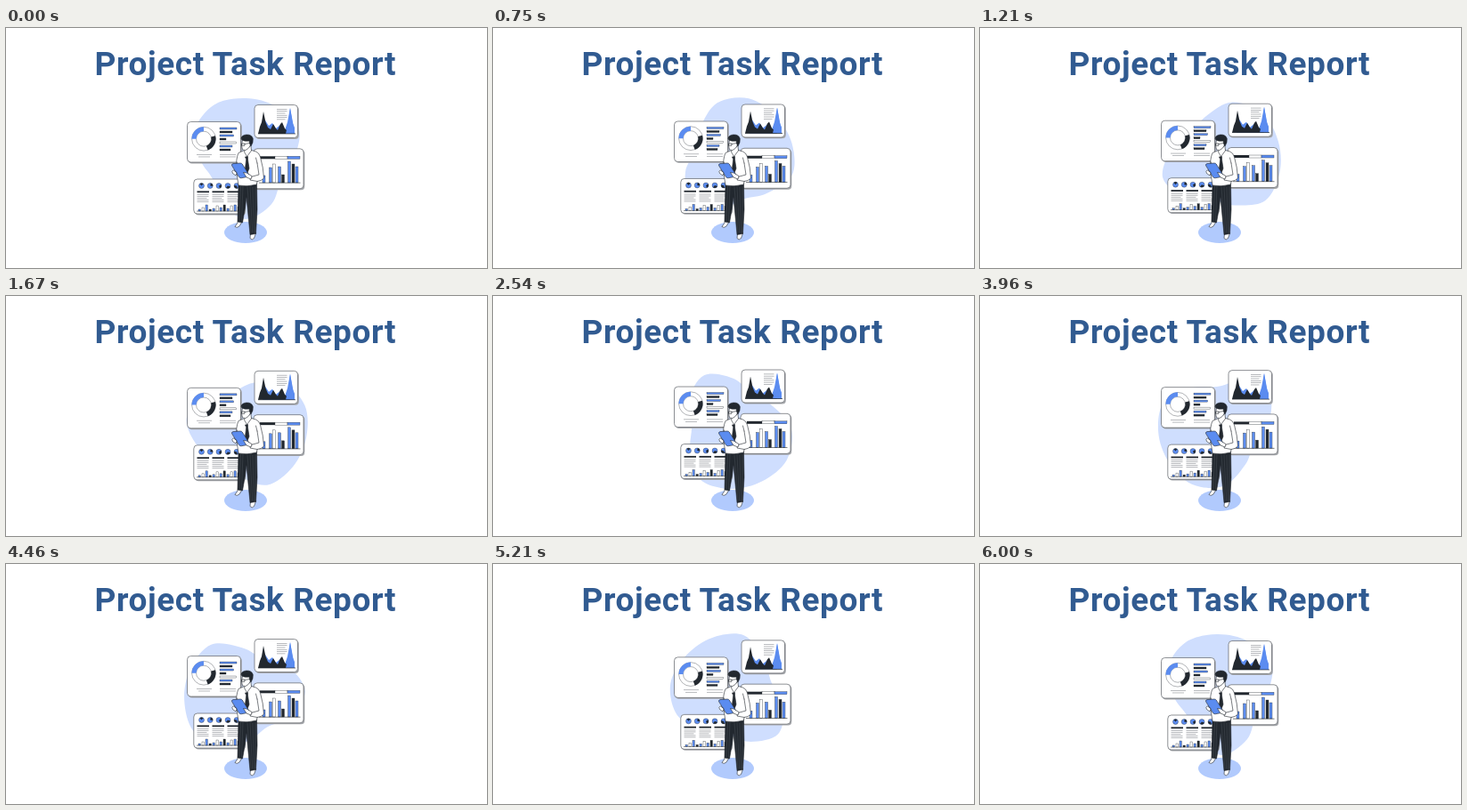
These frames come from a looping animation (540 px wide and 270 px high, 6.04 s). An HTML page:

```html
<!DOCTYPE html>
<html lang="en">
<head>
<meta charset="utf-8">
<title>Project Task Report</title>
<style>
html, body { margin: 0; width: 100%; height: 100%; overflow: hidden; background: #fff; }
svg { display: block; width: 540px; height: 270px; }
text { font: 600 37px Roboto, Inter, sans-serif; letter-spacing: .6px; fill: #315b91; }
</style>
</head>
<body>
<svg viewBox="0 0 540 270">
  <text x="99.5" y="53">Project Task Report</text>
  <path id="blob" fill="#cfdefe"/>
  <g id="panels"></g>
  <ellipse cx="269" cy="230" rx="24" ry="12" fill="#b1cafd"/>
  <g id="man" fill="#fff" stroke="#20252c" stroke-width=".6" stroke-linejoin="round" stroke-linecap="round"></g>
</svg>
<script>
const LOOP = 6040, CX = 269, CY = 148;
const BLUE = '#5b8cf0', DARK = '#22282f', GREY = '#9a9da2';
const el = id => document.getElementById(id);

const rect = (x, y, w, h, fill, extra = '') =>
  `<rect x="${x}" y="${y}" width="${w}" height="${h}" fill="${fill}" ${extra}/>`;
const path = (d, attrs = '') => `<path d="${d}" ${attrs}/>`;
const outline = `stroke="${DARK}" stroke-width=".35"`;
const lines = (x, y, w, count, gap) => Array.from({ length: count }, (_, i) =>
  rect(x, y + i * gap, w - (i % 3 === 2 ? 2 : 0), .7, GREY)).join('');
const panel = (x, y, w, h) =>
  rect(x + 1.3, y + 1.4, w, h, '#a6a8ac', 'rx="4"') +
  rect(x, y, w, h, '#fff', 'rx="4" stroke="#5c6066" stroke-width=".7"');

// Angles in degrees, clockwise from the top.
const polar = (cx, cy, r, deg) => {
  const a = deg * Math.PI / 180;
  return [cx + r * Math.sin(a), cy - r * Math.cos(a)];
};
const arc = (cx, cy, r, from, to) =>
  `M${polar(cx, cy, r, from)}A${r} ${r} 0 ${to - from > 180 ? 1 : 0} 1 ${polar(cx, cy, r, to)}`;

// Smooth closed blob through evenly spaced radii.
const radii = [69, 69, 69, 54, 46, 58, 67, 55, 43, 51, 66, 71];
const points = radii.map((r, i) => polar(CX, CY, r, i * 30));
const at = i => points[(i + 12) % 12];
const handle = (i, sign) => at(i).map((v, k) => v + sign * (at(i + 1)[k] - at(i - 1)[k]) / 6);
el('blob').setAttribute('d', `M${points[0]}` + points.map((_, i) =>
  `C${handle(i, 1)} ${handle(i + 1, -1)} ${at(i + 1)}`).join('') + 'Z');

function donutPanel() {
  const ring = (from, to, color) =>
    path(arc(222, 124.7, 11, from, to), `fill="none" stroke="${color}" stroke-width="5"`);
  const bars = [[19, BLUE], [14, DARK], [15.5, BLUE], [7, DARK], [18.5, '#fff'], [14, BLUE], [12, DARK]];
  return panel(203.5, 105.5, 60, 45.5) +
    `<circle cx="222" cy="124.7" r="13.4" fill="#fff" ${outline}/>` +
    `<circle cx="222" cy="124.7" r="8.5" fill="#fff" ${outline}/>` +
    ring(-90, 0, BLUE) + ring(75, 160, DARK) +
    bars.map(([w, c], i) => rect(240, 112 + i * 4, w, 2, c, outline)).join('') +
    lines(214, 142, 17, 1, 3) + lines(216, 144.6, 13, 1, 3) + lines(240, 142, 18, 2, 2.6);
}

function areaPanel() {
  return panel(279, 86.5, 48.5, 37) +
    path('M288 119L291 104L295 110L299 107L303 113L308 109L313 115L316 106L319 90L322 106L324 119Z', `fill="${BLUE}"`) +
    path('M283 119L285 111L287 106L289 94L291.5 106L294 112L297 114L300 108L303 113L305 115L308 108L310 106L313 113L317 117L319 119Z', `fill="${DARK}"`) +
    path('M314 119L317 106L319 90L321.5 106L324 112V119Z', `fill="${BLUE}"`) +
    rect(283, 118.6, 42, .7, DARK) + lines(304, 91, 11.5, 6, 2.3);
}

function barPanel() {
  const bars = [[288, 8, BLUE], [295.5, 17, BLUE], [299.5, 21, '#fff'], [305.5, 18, BLUE],
    [309.5, 9, DARK], [316.5, 24, BLUE], [321, 21, DARK], [325, 18, BLUE]];
  return panel(278, 135.8, 56, 45) +
    rect(285, 144.3, 17, 3, DARK) + rect(302, 144.3, 14, 3, '#fff', outline) + rect(316, 144.3, 14, 3, BLUE, outline) +
    bars.map(([x, h, c]) => rect(x, 174 - h, 3, h, c, outline)).join('') +
    rect(284, 173.8, 46.5, .6, DARK);
}

function tablePanel() {
  const pies = [219.5, 229.2, 239, 249, 259].map((x, i) =>
    `<circle cx="${x}" cy="177.5" r="3" fill="${BLUE}" ${outline}/>` +
    path(arc(x, 177.5, 3, i * 50 - 40, i * 60 + 40) + `L${x} 177.5Z`, `fill="${DARK}"`)).join('');
  const columns = [214.5, 231.5, 248.5].map(x =>
    rect(x, 183.4, 13.5, 1.8, DARK) + lines(x, 187.2, 13, 5, 2)).join('');
  const heights = [2, 4, 7, 2, 3, 6, 4, 7, 3, 6, 7, 5];
  return panel(210.8, 170, 57, 39) + pies + columns +
    heights.map((h, i) => rect(216 + i * 4, 206 - h, 2.4, h, [BLUE, '#fff', BLUE, DARK][i % 4], outline)).join('') +
    rect(214, 205.8, 50, .5, DARK);
}

el('panels').innerHTML = donutPanel() + areaPanel() + barPanel() + tablePanel();

const dark = `fill="${DARK}"`, stripe = 'fill="none" stroke="#656a72" stroke-width=".3"';
el('man').innerHTML =
  // shoes
  path('M260.5 217L259.5 220L257 223.5Q259 225.5 262 223L265 218Z') +
  path('M274.5 231L274 236.5Q276 239.5 278.5 236.5L280.5 231Z') +
  // trousers
  path('M261 175L260.5 197L260 218L265.5 219L268.5 202L270 190L274 232.5L280.5 231.5L282 204L281.5 174Z', dark) +
  [263.5, 266].map(x => path(`M${x} 178L${x - 1.5} 217`, stripe)).join('') +
  [271, 274, 277, 280].map((x, i) => path(`M${x} 179L${275 + i * 1.6} 230`, stripe)).join('') +
  // shirt and arms
  path('M266.5 138L261 140.5Q258 147 258.5 160L261 177Q271 179 281.5 176L282 172.5Q287 172 289.5 169Q289 157 285.5 145Q284 140 280.5 139L274 137Z') +
  path('M282 152L284 165L275 167.5L274 171L282 172.5M282 152L280.5 146M261 157L259.5 151', 'fill="none"') +
  // head
  path('M268 135L267.5 139.5L270.5 144.5L275.5 138L275 133Z') +
  path('M265.5 126L264.5 132L265.5 137Q269 139 272.5 135L276 129L274.5 124Z') +
  path('M264 124Q264.5 120.5 270 120Q276 119.8 277.3 124.5Q277.8 129 275 133L273.7 130.5L273 127Q268 128 265 126Z', dark) +
  path('M265 130H268V132.3H265ZM268 130.5L273.5 129.5', 'fill="none"') +
  // tie, tablet and hands
  path('M268.7 145L271.5 144.5L271.5 148L273 158L271 163L268.5 158L269.7 148Z', dark) +
  path('M253.5 154.5Q253 153 255 152.6L263 152Q264.5 152 265.2 153L273 165.5Q273.5 167 272 167.3L264 168.8Q262.5 169 261.6 167.7Z', `fill="${BLUE}"`) +
  path('M255 160Q252.8 161 254.5 163.5L258 166L259 163ZM270 163L266.5 162.5L270 168L275 170L276 167Z');

function draw(now) {
  const phase = now % LOOP / LOOP;
  const lift = -1.85 * (1 - Math.cos(phase * 2 * Math.PI));
  el('blob').setAttribute('transform', `rotate(${phase * 360} ${CX} ${CY})`);
  el('panels').setAttribute('transform', `translate(0 ${lift})`);
}
const start = performance.now();
function tick() {
  draw(performance.now() - start);
  requestAnimationFrame(tick);
}
draw(0);
tick();
</script>
</body>
</html>
```
